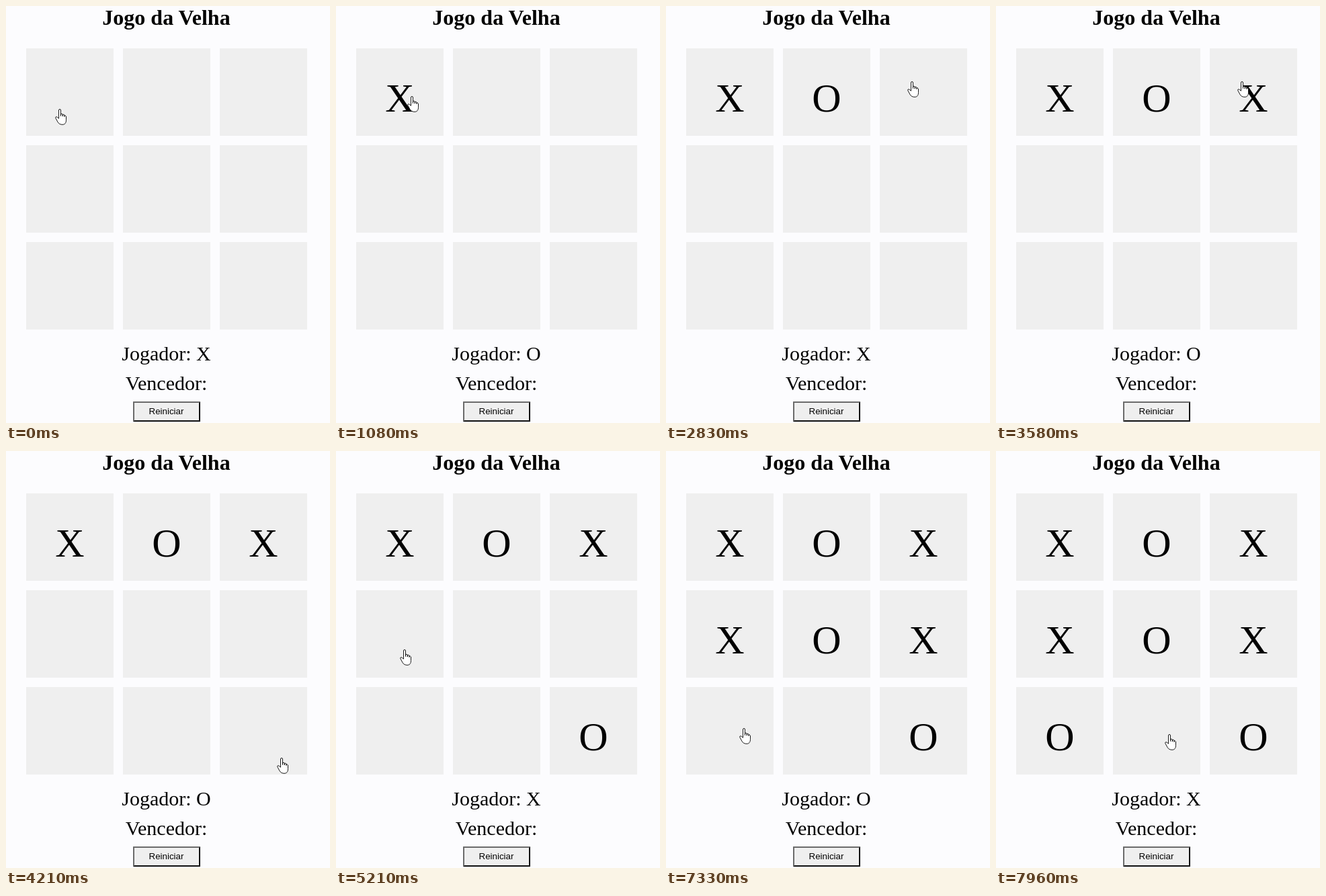
Write an HTML page that moves like this. It is 482x620 px and loops after 8000 ms.

```html
<!DOCTYPE html>
<html lang="pt">
<head>
<meta charset="utf-8">
<title>Jogo da Velha</title>
<style>
html, body { margin: 0; width: 100%; height: 100%; overflow: hidden; background: #fcfcfe; }
svg { display: block; }
text { font-family: "Liberation Serif", "Times New Roman", serif; text-anchor: middle; }
.title { font-size: 32px; font-weight: bold; }
.status { font-size: 30px; }
.mark { font-size: 60px; }
.label { font: 13.333px "Liberation Sans", Arial, sans-serif; }
.cell { fill: #efefef; }
</style>
</head>
<body>
<svg width="482" height="620" viewBox="0 0 482 620">
  <text class="title" x="238.5" y="28">Jogo da Velha</text>
  <g id="board"></g>
  <text class="status" id="player" x="238.5" y="527"></text>
  <text class="status" x="238.5" y="571">Vencedor:</text>
  <path fill="#6b6b6b" d="M189 588h100l-2 2h-96v26l-2 2z"/>
  <path fill="#101010" d="M289 588v30h-100l2-2h96v-26z"/>
  <rect class="cell" x="191" y="590" width="96" height="26"/>
  <text class="label" x="238.5" y="607">Reiniciar</text>
  <path id="hand" fill="#fff" stroke="#000" stroke-width=".9" stroke-linejoin="round"
    d="M5.5 14V2a1.5 1.5 0 0 1 3 0V10.5V7.5q1.6-.8 2.8.5V11V8.5q1.5-.8 2.7.6V11.5V10q1.6-.5 2.5 1v5.5C16.5 21 14.5 23.3 11 23.3C7.5 23.3 5.5 22 4 19.5L.8 13.6q-.5-2 1.5-1.8q1.7.4 3.2 2.7"/>
</svg>
<script>
const LOOP = 8000, SIZE = 130, PITCH = 144, LEFT = 30, TOP = 63;
const START = { x: 73, y: 153 };
// The pointer leaves its last place, arrives at x, y and clicks there (times in ms).
const turns = [
  [130, 670, 106, 134, 1000],
  [1580, 1880, 238, 121, 2330],
  [2380, 2830, 359, 112, 3210],
  [3600, 4210, 403, 456, 4540],
  [4600, 5100, 95, 295, 5250],
  [5400, 5900, 265, 302, 5980],
  [6290, 6670, 354, 289, 6830],
  [6880, 7435, 84, 424, 7500],
  [7670, 7960, 251, 421, LOOP]
].map(([leave, arrive, x, y, click]) => ({ leave, arrive, x, y, click }));

const board = document.getElementById("board");
const player = document.getElementById("player");
const hand = document.getElementById("hand");

function add(tag, attrs) {
  const el = document.createElementNS("http://www.w3.org/2000/svg", tag);
  for (const key in attrs) el.setAttribute(key, attrs[key]);
  return board.appendChild(el);
}

const marks = Array.from({ length: 9 }, (_, i) => {
  const x = LEFT + i % 3 * PITCH, y = TOP + Math.floor(i / 3) * PITCH;
  add("rect", { class: "cell", x, y, width: SIZE, height: SIZE });
  return add("text", { class: "mark", x: x + SIZE / 2, y: y + 94 });
});

function markAt({ x, y }) {
  return marks[Math.floor((x - LEFT) / PITCH) + 3 * Math.floor((y - TOP) / PITCH)];
}

function ease(t, from, to) {
  const p = Math.min(1, Math.max(0, (t - from) / (to - from)));
  return p * p * (3 - 2 * p);
}

function pointer(t) {
  let { x, y } = START;
  for (const turn of turns) {
    const e = ease(t, turn.leave, turn.arrive);
    x += (turn.x - x) * e;
    y += (turn.y - y) * e;
  }
  return [Math.round(x), Math.round(y)];
}

function draw() {
  const t = performance.now() % LOOP;
  turns.forEach((turn, i) => {
    markAt(turn).textContent = t >= turn.click ? "XO"[i % 2] : "";
  });
  const played = turns.filter(turn => t >= turn.click).length;
  player.textContent = "Jogador: " + "XO"[played % 2];
  hand.setAttribute("transform", `translate(${pointer(t)})`);
  requestAnimationFrame(draw);
}
draw();
</script>
</body>
</html>
```
